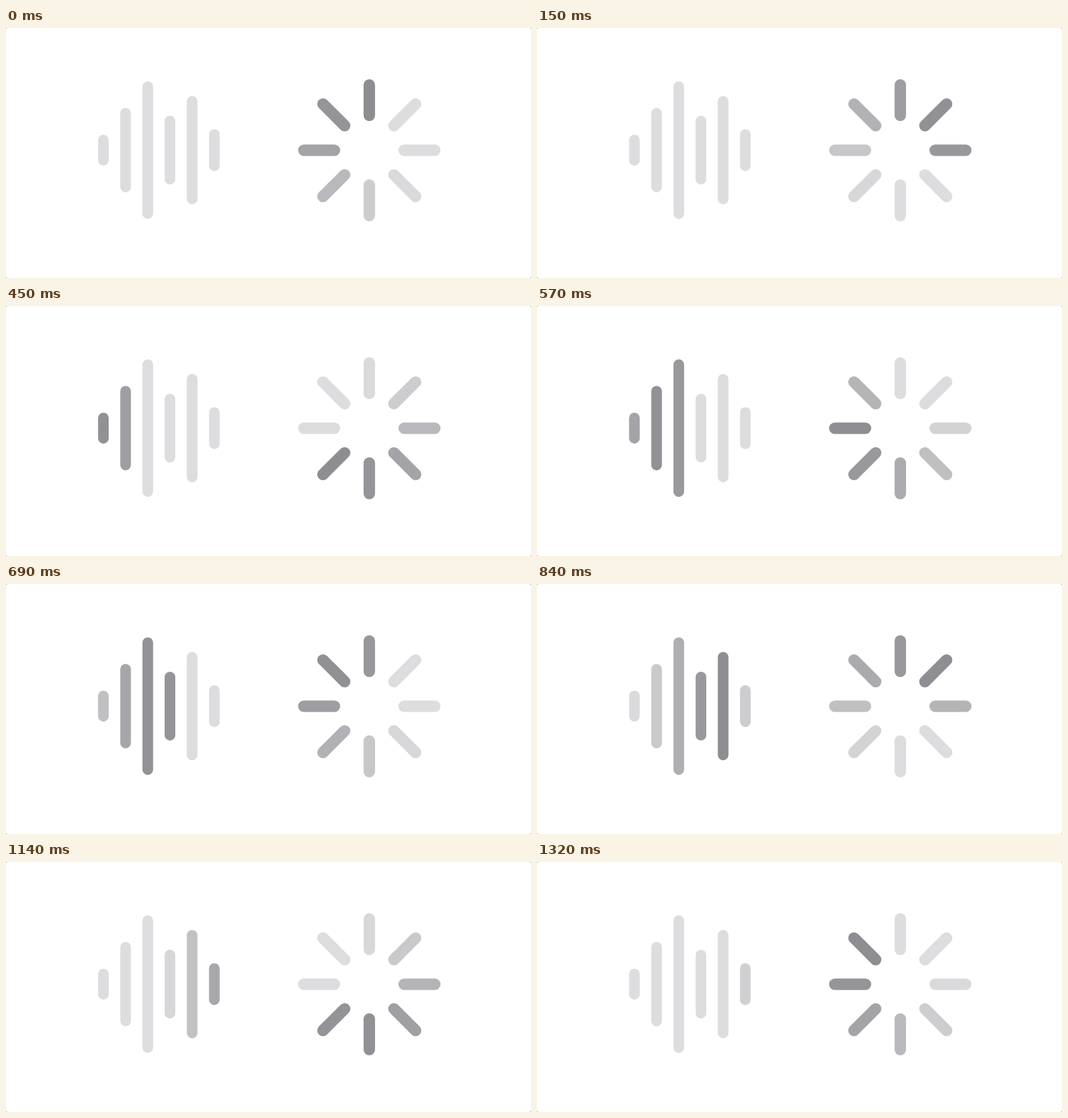
An HTML page without scripts that plays this animation: 788 by 376 pixels, repeating every 1.38 s.

```html
<!DOCTYPE html>
<html lang="en">
<head>
<meta charset="utf-8">
<title>Loading indicators</title>
<style>
  /* Elapsed milliseconds; every colour below is derived from it. */
  @property --t { syntax: "<number>"; inherits: true; initial-value: 0; }

  html, body { margin: 0; width: 100%; height: 100%; overflow: hidden; background: #666; }
  svg {
    display: block; width: 788px; height: 376px;
    background: #fff; border-radius: 2px;
    animation: clock 1380ms infinite;
  }
  @keyframes clock {
    0% { --t: 0; animation-timing-function: steps(44); }
    95.65%, 100% { --t: 1320; }
  }

  line {
    stroke-linecap: round;
    /* --rise and --fall run 0 to 1: quick ease-out in, smoothstep out */
    --level: calc(sin(var(--rise) * 90deg)
      * (1 - var(--fall) * var(--fall) * (3 - 2 * var(--fall))));
    --grey: calc(221 - 80 * var(--level));
    stroke: rgb(var(--grey) var(--grey) calc(223 - 77 * var(--level)));
  }

  .bars line {
    stroke-width: 16px;
    --age: calc(var(--t) - 390 - 111 * var(--i));
    --rise: clamp(0, 1 + var(--age) / 120, 1);
    --fall: clamp(0, var(--age) / 504, 1);
  }

  .spokes line {
    stroke-width: 17.2px;
    transform: rotate(calc(var(--i) * 45deg));
    --phase: calc(var(--t) / 90 + max(0, var(--t) - 1080) / 720);
    /* -1 to 0 while lighting up, 0 to 7 while fading */
    --age: calc(mod(var(--phase) - var(--i) + 1.001, 8) - 1);
    --rise: clamp(0, 1 + var(--age), 1);
    --fall: clamp(0, var(--age) / 5.6, 1);
  }
</style>
</head>
<body>
<svg viewBox="0 0 788 376">
  <g class="bars" transform="translate(146.2 183.7)">
    <line style="--i:0" y1="-15.2" y2="15.2"/>
    <line style="--i:1" x1="33.3" x2="33.3" y1="-55.5" y2="55.5"/>
    <line style="--i:2" x1="66.6" x2="66.6" y1="-95.5" y2="95.5"/>
    <line style="--i:3" x1="99.9" x2="99.9" y1="-43.7" y2="43.7"/>
    <line style="--i:4" x1="133.2" x2="133.2" y1="-73.5" y2="73.5"/>
    <line style="--i:5" x1="166.5" x2="166.5" y1="-23.5" y2="23.5"/>
  </g>
  <g class="spokes" transform="translate(545.3 183.8)">
    <line style="--i:0" y1="-52.3" y2="-98.3"/>
    <line style="--i:1" y1="-52.3" y2="-98.3"/>
    <line style="--i:2" y1="-52.3" y2="-98.3"/>
    <line style="--i:3" y1="-52.3" y2="-98.3"/>
    <line style="--i:4" y1="-52.3" y2="-98.3"/>
    <line style="--i:5" y1="-52.3" y2="-98.3"/>
    <line style="--i:6" y1="-52.3" y2="-98.3"/>
    <line style="--i:7" y1="-52.3" y2="-98.3"/>
  </g>
</svg>
</body>
</html>
```
